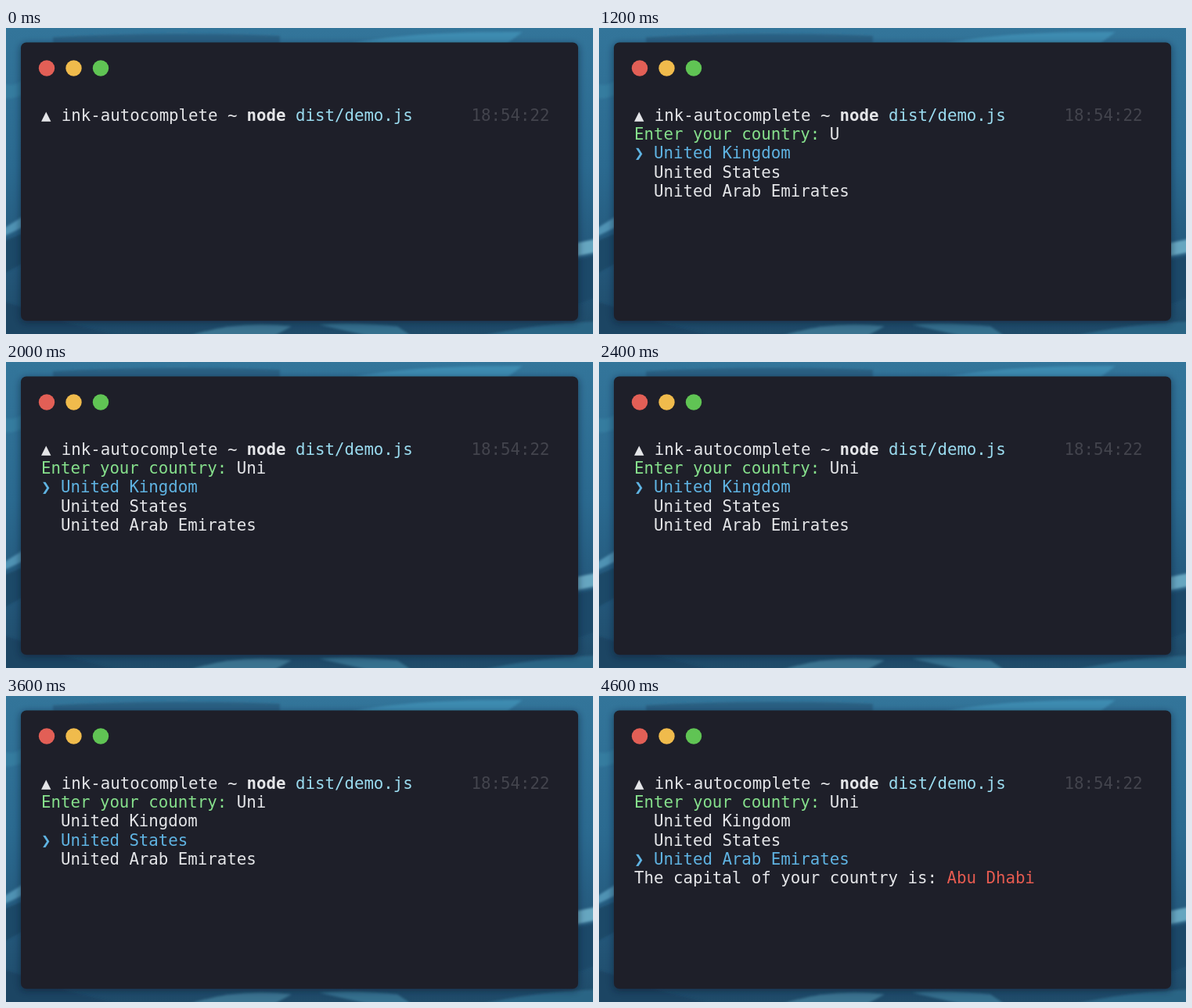
Recreate the animation shown at these times as an HTML page. Size 750 by 392 pixels, loop 4.8 s.

```html
<!DOCTYPE html>
<html lang="en">
<head>
<meta charset="utf-8">
<title>Autocomplete demo</title>
<style>
  html, body { margin: 0; width: 100%; height: 100%; overflow: hidden; background: #25618a; }
  svg { display: block; width: 750px; height: 392px; }
  text {
    font: 20.74px "DejaVu Sans Mono", "Liberation Mono", monospace;
    fill: #e4e5e8;
    white-space: pre;
  }
  .bold { font-weight: 700; }
  .path { fill: #9bdcf0; }
  .clock { fill: #43444d; }
  .green { fill: #86e08c; }
  .hint { fill: #83848b; }
  .red { fill: #e65b50; }
  .blue { fill: #5fb3e2; }

  /* Every change is a hard cut on the shared 4.8 s clock. */
  .cut { animation: 4.8s step-end infinite; }
  .prompt { animation-name: prompt; }
  .hint { animation-name: hint; }
  .k1 { animation-name: key1; }
  .k2 { animation-name: key2; }
  .k3 { animation-name: key3; }
  .list { animation-name: key1; }
  .answer { animation-name: answer; }
  .arrow { animation-name: arrow; }
  .row1 { animation-name: row1; }
  .row2 { animation-name: row2; }
  .row3 { animation-name: row3; }

  @keyframes prompt { 0% { visibility: hidden } 8.33%, 100% { visibility: visible } }
  @keyframes hint { 0% { visibility: hidden } 8.33% { visibility: visible } 25%, 100% { visibility: hidden } }
  @keyframes key1 { 0% { visibility: hidden } 25%, 100% { visibility: visible } }
  @keyframes key2 { 0% { visibility: hidden } 33.33%, 100% { visibility: visible } }
  @keyframes key3 { 0% { visibility: hidden } 41.66%, 100% { visibility: visible } }
  @keyframes answer { 0% { visibility: hidden } 91.66%, 100% { visibility: visible } }
  @keyframes arrow {
    0% { transform: none }
    58.33% { transform: translateY(24.2px) }
    62.5% { transform: translateY(48.4px) }
    70.83% { transform: translateY(24.2px) }
    83.33%, 100% { transform: translateY(48.4px) }
  }
  @keyframes row1 { 0% { fill: #5fb3e2 } 58.33%, 100% { fill: #e4e5e8 } }
  @keyframes row2 {
    0% { fill: #e4e5e8 }
    58.33% { fill: #5fb3e2 }
    62.5% { fill: #e4e5e8 }
    70.83% { fill: #5fb3e2 }
    83.33%, 100% { fill: #e4e5e8 }
  }
  @keyframes row3 {
    0% { fill: #e4e5e8 }
    62.5% { fill: #5fb3e2 }
    70.83% { fill: #e4e5e8 }
    83.33%, 100% { fill: #5fb3e2 }
  }
</style>
</head>
<body>
<svg viewBox="0 0 750 392">
  <defs>
    <linearGradient id="sea" x2="0" y2="1">
      <stop offset="0" stop-color="#33759a"/>
      <stop offset=".45" stop-color="#2b6a90"/>
      <stop offset=".75" stop-color="#24587b"/>
      <stop offset="1" stop-color="#1f4b69"/>
    </linearGradient>
    <filter id="soft" x="-10%" y="-10%" width="120%" height="120%"><feGaussianBlur stdDeviation="1.5"/></filter>
    <filter id="shade" x="-10%" y="-10%" width="120%" height="120%"><feGaussianBlur stdDeviation="4"/></filter>
  </defs>

  <rect width="750" height="392" fill="url(#sea)"/>
  <g filter="url(#soft)">
    <path d="M60 12Q190 4 350 10V22H60Z" fill="#2a6183"/>
    <path d="M440 20Q520 4 660 5L640 20Z" fill="#3e8bb0"/>
    <path d="M-5 70Q10 78 24 64V84Q10 92-5 90Z" fill="#357c9f"/>
    <path d="M-5 258L24 240V254L-5 268Z" fill="#4f92b3"/>
    <path d="M-5 274L24 262V300L-5 316Z" fill="#1c4868"/>
    <path d="M-5 350Q30 360 80 378L150 396H-5Z" fill="#1d4564"/>
    <path d="M726 276L755 270V287L726 293Z" fill="#66a6c0"/>
    <path d="M726 297L755 291V345L726 355Z" fill="#1b4969"/>
    <path d="M230 396Q290 374 365 382L340 396Z" fill="#3b7390"/>
    <path d="M400 380Q440 376 500 382L520 396H470Z" fill="#35708e"/>
    <path d="M600 396Q680 378 755 376V396Z" fill="#2c6585"/>
  </g>

  <rect x="18" y="20" width="714" height="358" rx="8" fill="#08192a" opacity=".5" filter="url(#shade)"/>
  <rect x="19" y="18.5" width="712" height="356.5" rx="7" fill="#1e1f29"/>
  <circle cx="52" cy="51.5" r="10.2" fill="#e25f56"/>
  <circle cx="86.5" cy="51.5" r="10.2" fill="#f0bb4c"/>
  <circle cx="121" cy="51.5" r="10.2" fill="#60c454"/>

  <text x="45" y="119">▲</text>
  <text x="70.8" y="119">ink-autocomplete ~</text>
  <text x="307.6" y="119" class="bold">node</text>
  <text x="370" y="119" class="path">dist/demo.js</text>
  <text x="594.6" y="119" class="clock">18:54:22</text>

  <text x="45" y="143.2" class="cut prompt green">Enter your country:</text>
  <text x="294.7" y="143.2" class="cut hint">Type a country</text>
  <text x="294.7" y="143.2" class="cut k1">U</text>
  <text x="307.2" y="143.2" class="cut k2">n</text>
  <text x="319.7" y="143.2" class="cut k3">i</text>

  <g class="cut list">
    <text x="45" y="167.4" class="cut arrow blue">❯</text>
    <text x="70" y="167.4" class="cut row1">United Kingdom</text>
    <text x="70" y="191.6" class="cut row2">United States</text>
    <text x="70" y="215.8" class="cut row3">United Arab Emirates</text>
  </g>

  <g class="cut answer">
    <text x="45" y="240">The capital of your country is:</text>
    <text x="444.5" y="240" class="red">Abu Dhabi</text>
  </g>
</svg>
</body>
</html>
```
